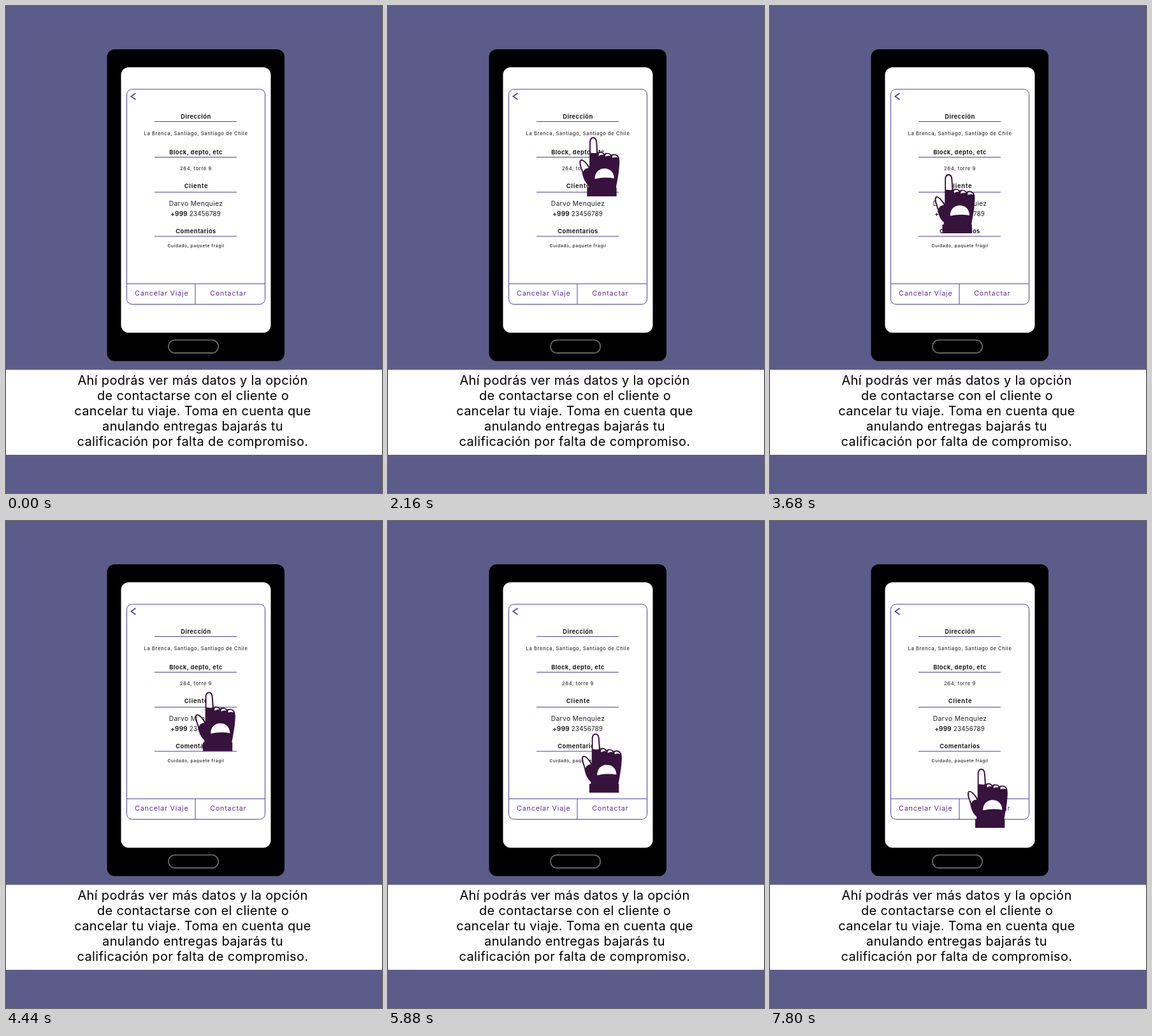
Write an HTML page that moves like this. It is 590 by 765 pixels and loops after 8 s.

```html
<!DOCTYPE html>
<html lang="es">
<head>
<meta charset="utf-8">
<style>
  html, body { margin: 0; width: 100%; height: 100%; overflow: hidden; background: #5c5c8a; }
  svg { display: block; }
  text { font-family: Inter, sans-serif; text-anchor: middle; }
  .line { fill: none; stroke: #51409a; stroke-width: 1; }
  .heading { font-size: 9.3px; font-weight: 700; letter-spacing: .46px; fill: #1d1d1b; }
  .detail { font-size: 7.6px; font-weight: 500; letter-spacing: .6px; fill: #333; }
  .note { font-size: 6.8px; font-weight: 500; letter-spacing: .56px; fill: #222; }
  .client { font-size: 10.3px; letter-spacing: .35px; fill: #222; }
  .phone { font-size: 9.8px; letter-spacing: .2px; fill: #222; }
  .button { font-size: 10.8px; letter-spacing: .78px; fill: #5c2d91; }
  .caption { font-size: 20px; letter-spacing: .34px; fill: #000; }
</style>
</head>
<body>
<svg width="590" height="765" viewBox="0 0 590 765">
  <rect width="590" height="765" fill="#5c5c8a"/>

  <rect x="158.5" y="68" width="278.5" height="489.7" rx="12"/>
  <rect x="180.5" y="96.3" width="235" height="417" rx="12" fill="#fff"/>
  <rect x="254.9" y="524.6" width="78.4" height="20.4" rx="10.2" fill="none" stroke="#666" stroke-width="1.8"/>

  <rect class="line" x="189.5" y="130.8" width="217" height="337.7" rx="8"/>
  <path class="line" d="M189.5 436.3H406.5M297 436.3V468.5"/>
  <path class="line" d="M233 181.5H362M233 237.5H362M233 292.4H362M233 361.8H362"/>
  <path class="line" d="M203.5 137L196.3 142L203.5 147" style="stroke-width:1.7"/>

  <text class="heading" x="298" y="176.6">Dirección</text>
  <text class="detail" x="298" y="202.8">La Brenca, Santiago, Santiago de Chile</text>
  <text class="heading" x="298" y="232.7">Block, depto, etc</text>
  <text class="detail" x="298" y="257.6">264, torre 9</text>
  <text class="heading" x="298.5" y="286.4" style="letter-spacing:.8px">Cliente</text>
  <text class="client" x="298" y="314">Darvo Menquiez</text>
  <text class="phone" x="297.7" y="330"><tspan font-weight="700">+999</tspan> 23456789</text>
  <text class="heading" x="298" y="357">Comentarios</text>
  <text class="note" x="298" y="379.2">Cuidado, paquete frágil</text>
  <text class="button" x="244.3" y="455.3">Cancelar Viaje</text>
  <text class="button" x="348.8" y="455.3">Contactar</text>

  <rect y="571.5" width="590" height="133.5" fill="#fff"/>
  <g class="caption">
    <text x="293" y="595">Ahí podrás ver más datos y la opción</text>
    <text x="293.5" y="619">de contactarse con el cliente o</text>
    <text x="293" y="643">cancelar tu viaje. Toma en cuenta que</text>
    <text x="293" y="667">anulando entregas bajarás tu</text>
    <text x="293" y="691">calificación por falta de compromiso.</text>
  </g>

  <g id="hand" transform="translate(-72 376)">
    <path fill="#37123d" d="M16.7 46.8V8.8C16.7 3.3 18.9.3 22.6.3C26.4.3 28.6 3.3 28.8 8.8L30 24.4
      C32.9 22.4 37.4 22.8 40 26.3C42.9 24.1 48.4 24.6 51 28C54.4 25.8 60.4 26.8 62.4 30.3C64.6 34.8 63.8 42 63.4 47
      C62.8 58 60.4 68 58.4 79.6H59.3V93.3H12.9V79.6H15.2V76C9.4 71 6.6 64 5.2 56C3.4 49 .8 45 1 39.8
      C1.2 35.3 3.9 34.4 6.9 36.2C10.9 38.6 13.9 42.8 16.7 46.8Z"/>
    <g fill="#fff">
      <path d="M18.6 25.2V9.3C18.6 4.8 20 2.4 22.6 2.4C25.4 2.4 26.6 4.8 26.9 9.3L27.9 24.8C24.9 26.2 21.4 24.4 18.6 25.2Z"/>
      <path d="M3 39.8C3 36.6 4.8 36.8 6.8 38.2C10.4 40.8 13.4 45.3 15.4 49.2C10.9 49.2 8.4 51.2 7 54.8C5.2 49.4 3.1 44.8 3 39.8Z"/>
      <path d="M31.1 27C33.2 23.9 37.2 24.6 39 28.4C36.4 27.8 33.8 28.2 31.5 30Z"/>
      <path d="M41.6 28.6C43.8 25.5 48 26 49.8 30C47.2 29.4 44.4 29.6 42 31.2Z"/>
      <path d="M52.5 30.2C54.9 27.7 59.5 28.3 61.4 32.6C58.5 31.5 55.4 31.7 52.8 33Z"/>
      <path d="M25.2 66C25 56.3 31.2 49.6 40.2 49.6C49.7 49.6 55.4 56.3 55.4 65.2Q40.4 62.2 25.2 66Z"/>
    </g>
  </g>
</svg>

<script>
  const LOOP = 8000, STEP = 40;

  // Each move: first step time, last step time, end x, end y
  const moves = [
    [200, 1000, 138, 248],
    [1040, 1840, 236, 208],
    [1880, 2360, 339, 204.2],
    [2680, 3400, 254, 263.8],
    [3680, 4160, 300, 263.4],
    [4440, 5000, 239, 333.8],
    [5280, 5920, 307, 333.4],
    [6240, 6960, 239, 388.8],
    [7240, 7800, 309, 388.6],
  ];
  const hand = document.getElementById("hand");

  function handPosition(time) {
    let x = -72, y = 376;
    for (const [first, last, endX, endY] of moves) {
      if (time < first) break;
      const progress = Math.min(1, (time - first + STEP) / (last - first + STEP));
      x += (endX - x) * progress;
      y += (endY - y) * progress;
    }
    return [x, y];
  }

  function draw(now) {
    const time = Math.floor((now % LOOP) / STEP) * STEP;
    hand.setAttribute("transform", `translate(${handPosition(time).join(" ")})`);
    requestAnimationFrame(draw);
  }
  requestAnimationFrame(draw);
</script>
</body>
</html>
```
